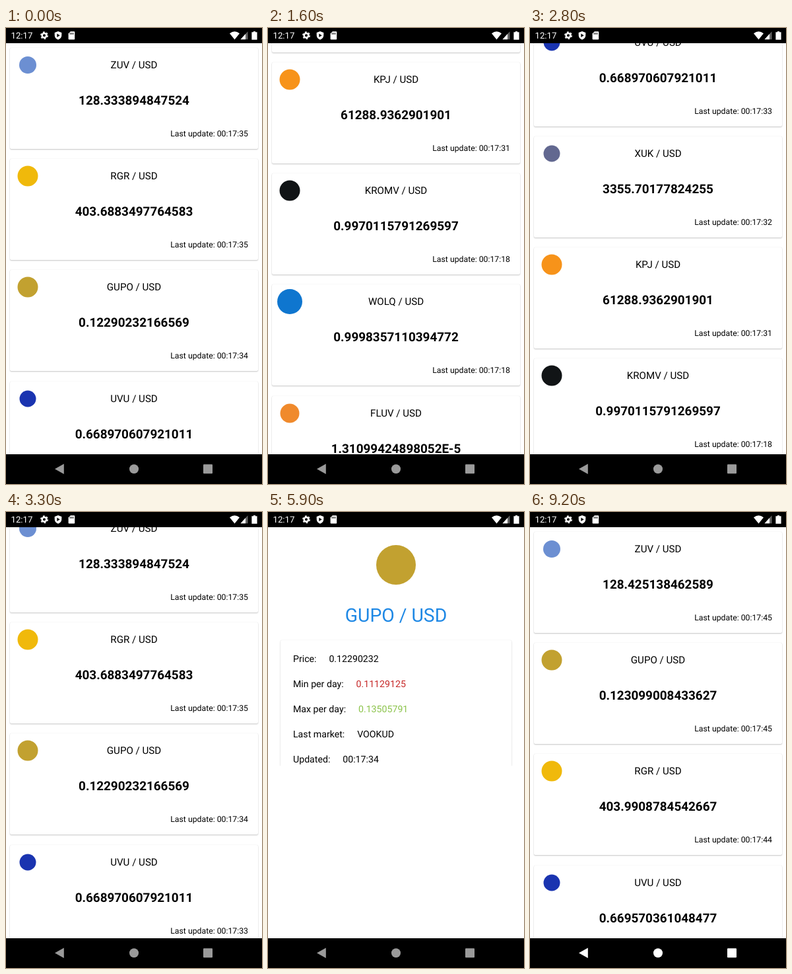
An HTML page for the animation above (9500 ms loop, 388x690 px).

```html
<!DOCTYPE html>
<html lang="en">
<head>
<meta charset="utf-8">
<title>Rates</title>
<style>
html, body { margin: 0; width: 100%; height: 100%; overflow: hidden; background: #000; }
#stage { position: relative; width: 388px; height: 690px; overflow: hidden; background: #000; color: #000; font-family: Roboto, sans-serif; text-rendering: geometricPrecision; }
.window { position: absolute; inset: 0; background: #000; transform-origin: 50% 50%; }
.page { position: absolute; left: 0; top: 23px; width: 388px; height: 622px; overflow: hidden; background: #fff; }
.card { position: absolute; left: 6px; width: 376px; height: 153px; border-radius: 2px; background: #fff; box-shadow: 0 1px 2px rgba(0,0,0,.22), 0 0 1px rgba(0,0,0,.12); }
.card div { position: absolute; left: 0; right: 0; line-height: 24px; text-align: center; white-space: nowrap; }
.card .name { top: 14px; font-size: 15.1px; }
.card .price { top: 68px; font-size: 18.88px; font-weight: 700; }
.card .time { top: 118px; right: 15px; font-size: 12.27px; text-align: right; }
.coin { position: absolute; border-radius: 50%; transform: translate(-50%, -50%); }
.heading { position: absolute; top: 114px; width: 100%; line-height: 40px; text-align: center; font-size: 28.32px; color: #1e88e5; }
.info { position: absolute; left: 19px; top: 171px; width: 350px; height: 190px; border-radius: 2px 2px 0 0; box-shadow: 0 1px 2px rgba(0,0,0,.22), 0 0 1px rgba(0,0,0,.12); clip-path: inset(-3px -3px 0 -3px); }
.info p { position: absolute; left: 19px; margin: 0; line-height: 24px; font-size: 14.16px; white-space: nowrap; }
.info span { margin-left: 18.9px; }
#system { position: absolute; inset: 0; }
</style>
</head>
<body>
<div id="stage">
  <div class="window" id="list">
    <div class="page"><div id="before"></div><div id="after"></div></div>
  </div>
  <div class="window" id="detail">
    <div class="page">
      <i class="coin" style="left:194px;top:56.5px;width:60px;height:60px;background:#c2a130"></i>
      <div class="heading">GUPO / USD</div>
      <div class="info" id="info"></div>
    </div>
  </div>
  <svg id="system" width="388" height="690" fill="#fff">
    <text x="7.5" y="16.3" font-size="13.2" font-family="Roboto, sans-serif">12:17</text>
    <circle cx="58" cy="11.3" r="3.3" fill="none" stroke="#fff" stroke-width="2.6"/>
    <circle cx="58" cy="11.3" r="5.2" fill="none" stroke="#fff" stroke-width="1.6" stroke-dasharray="2.72"/>
    <path d="M79 5l5.3 2.1v4q0 4.6-5.3 6.7q-5.3-2.1-5.3-6.7v-4z"/>
    <path d="M77.3 8.6l4.4 2.7l-4.4 2.7z" fill="#000"/>
    <path d="M97.8 5.2h5.4q1 0 1 1v10.2q0 1-1 1h-7.6q-1 0-1-1V8.4z"/>
    <path d="M97.3 7.2v2.6M99.5 7.2v2.6M101.7 7.2v2.6" stroke="#000" stroke-width="1.1"/>
    <path d="M339 8.3q7.5-6 15 0l-7.5 9.2z"/>
    <path d="M355.5 17.3L366.5 5.3v12z" opacity=".4"/>
    <path d="M355.5 17.3L363 9.1v8.2z"/>
    <path d="M375 5h3v1.3h2.6v11.5h-8.2V6.3H375z"/>
    <rect id="ripple" x="46" y="644.7" width="71" height="45.3" rx="22.6" fill="#222"/>
    <g id="nav"><path d="M74 667.3l13.8-7.8v15.6z"/><circle cx="194" cy="667.3" r="7"/><rect x="299" y="660.3" width="14" height="14" rx="1"/></g>
  </svg>
</div>
<script>
const LOOP = 9500, STEP = 100, PITCH = 168.2, END = 891;
const $ = id => document.getElementById(id);

// name: [colour, diameter]
const coins = {
  ZUV: ['#6c8fd2', 26], RGR: ['#f0b90b', 31], GUPO: ['#c2a130', 31],
  UVU: ['#1a34b0', 25], XUK: ['#626890', 25], KPJ: ['#f7931a', 31],
  KROMV: ['#111416', 31], WOLQ: ['#0f76cf', 38], FLUV: ['#f08a2c', 29]
};
const before = [
  ['ZUV', '128.333894847524', 35], ['RGR', '403.6883497764583', 35],
  ['GUPO', '0.12290232166569', 34], ['UVU', '0.668970607921011', 33],
  ['XUK', '3355.70177824255', 32], ['KPJ', '61288.9362901901', 31],
  ['KROMV', '0.9970115791269597', 18], ['WOLQ', '0.9998357110394772', 18],
  ['FLUV', '1.31099424898052E-5', 18]
];
const after = [
  ['ZUV', '128.425138462589', 45], ['GUPO', '0.123099008433627', 45],
  ['RGR', '403.9908784542667', 44], ['UVU', '0.669570361048477', 43]
];
const info = [
  ['Price', '0.12290232', '#000'], ['Min per day', '0.11129125', '#c62828'],
  ['Max per day', '0.13505791', '#8bc34a'], ['Last market', 'VOOKUD', '#000'],
  ['Updated', '00:17:34', '#000']
];

const card = ([name, price, sec], i) => {
  const [color, size] = coins[name];
  return `<div class="card" style="top:${7 + i * PITCH}px">
    <i class="coin" style="left:27px;top:26px;width:${size}px;height:${size}px;background:${color}"></i>
    <div class="name">${name} / USD</div><div class="price">${price}</div>
    <div class="time">Last update: 00:17:${sec}</div></div>`;
};
$('before').innerHTML = before.map(card).join('');
$('after').innerHTML = after.map(card).join('');
$('info').innerHTML = info.map(([label, value, color], i) =>
  `<p style="top:${16.5 + i * 38.2}px">${label}:<span style="color:${color}">${value}</span></p>`).join('');

const clamp = x => Math.min(1, Math.max(0, x));
const part = (t, from, to) => clamp((t - from) / (to - from));
const mix = (a, b, p) => a + (b - a) * p;
const fling = (x, power) => 1 - (1 - x) ** power;

const cubic = (a, b, c, d, u) => {
  const v = 1 - u;
  return a * v * v * v + 3 * b * v * v * u + 3 * c * v * u * u + d * u * u * u;
};

// fast start, very slow finish, as two joined Bezier pieces
function settle(x) {
  const [px, py] = x < 1 / 6
    ? [[0, .05, .13333, 1 / 6], [0, 0, .06, .4]]
    : [[1 / 6, .20833, .25, 1], [.4, .82, 1, 1]];
  let lo = 0, hi = 1;
  for (let i = 0; i < 24; i++) {
    const mid = (lo + hi) / 2;
    if (cubic(...px, mid) < x) lo = mid; else hi = mid;
  }
  return cubic(...py, lo);
}

function scrollAt(t) {
  if (t < 1150) return 480 * fling(part(t, 50, 1050), 2.4);
  if (t < 2650) return mix(480, END, fling(part(t, 1150, 2000), 2.31));
  return END * (1 - fling(part(t, 2650, 3600), 2.92));
}

function draw(t) {
  const closing = t >= 7880;
  const open = settle(part(t, 4530, 5130));
  const close = settle(part(t, 7880, 8380));

  $('before').style.transform = `translateY(${-Math.round(scrollAt(t))}px)`;
  $('before').style.display = t < 9100 ? '' : 'none';
  $('after').style.display = t < 9100 ? 'none' : '';

  const listScale = closing ? mix(1.05, 1, close) : mix(1, 1.05, open);
  const detailScale = closing ? mix(1, .9, close) : mix(.85, 1, open);
  const alpha = closing ? 1 - part(t, 7920, 8000) : part(t, 4600, 4680);
  $('list').style.transform = listScale === 1 ? 'none' : `scale(${listScale})`;
  $('detail').style.transform = detailScale > .9999 ? 'none' : `scale(${detailScale})`;
  $('detail').style.opacity = alpha;
  $('detail').style.visibility = alpha > 0 ? 'visible' : 'hidden';

  $('ripple').style.opacity = t < 7700 ? 0 : 1 - part(t, 7800, 8200);
  $('nav').style.fill = t < 7900 ? '#9a9a9a' : '#fff';
}

const start = performance.now();
function tick() {
  const t = (performance.now() - start) % LOOP;
  draw(Math.floor(t / STEP) * STEP);
  requestAnimationFrame(tick);
}
tick();
</script>
</body>
</html>
```
